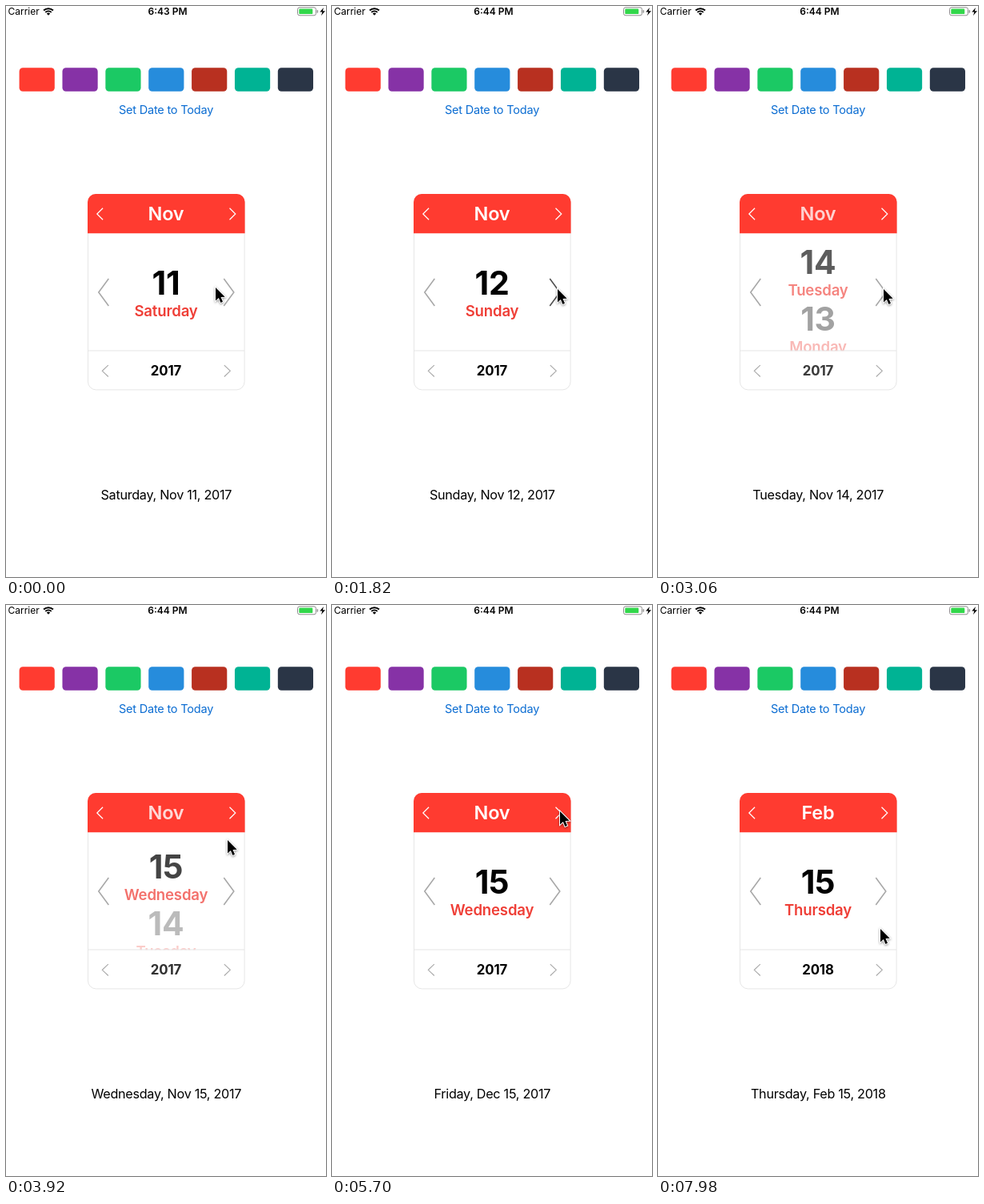
An HTML page with a canvas for the animation above (8 s loop, 400 by 714 pixels).

```html
<!DOCTYPE html>
<html lang="en">
<head>
<meta charset="utf-8">
<title>Date picker</title>
<style>
  html, body { margin: 0; width: 100%; height: 100%; overflow: hidden; background: #fff; }
  canvas { display: block; width: 400px; height: 714px; }
</style>
</head>
<body>
<canvas></canvas>
<script>
const canvas = document.querySelector('canvas');
const ctx = canvas.getContext('2d');
const ratio = window.devicePixelRatio || 1;
canvas.width = 400 * ratio;
canvas.height = 714 * ratio;

const LOOP = 8000, SLIDE = 400, PRESS = 110;
const RED = '#ff3b30', GREY = '#a8a8a8';
const SWATCHES = [RED, '#8632a6', '#1bc964', '#268cdc', '#b83020', '#00b394', '#2a3546'];

// Taps on the "next" arrows: time and which part of the date advances
const TAPS = [
  [1050, 'day'], [1920, 'day'], [2825, 'day'], [3656, 'day'],
  [5690, 'month'], [6555, 'month'], [7260, 'month']
];

// Pointer positions: time, x, y
const POINTER = [
  [0, 262, 352], [250, 262, 352], [700, 282, 354], [3720, 282, 354],
  [3920, 277, 294], [4250, 285, 258], [7450, 285, 258], [7850, 278, 405]
];

const FONTS = {
  carrier: ['400 12px', 0],
  clock: ['600 12px', 0],
  link: ['400 14.5px', -0.2],
  label: ['400 16.2px', -0.29],
  month: ['600 23.5px', -0.2],
  day: ['700 41px', -0.3],
  weekday: ['600 18.6px', -0.18],
  year: ['700 16.8px', -0.1]
};

const dateLabel = date => date.toLocaleDateString('en-US',
  { weekday: 'long', month: 'short', day: 'numeric', year: 'numeric' });

const labels = [dateLabel(new Date(2017, 10, 11))];
let days = 11, months = 10;
for (const [, unit] of TAPS) {
  if (unit === 'day') days++; else months++;
  labels.push(dateLabel(new Date(2017, months, days)));
}

const clamp = v => Math.min(1, Math.max(0, v));
const ease = v => v * v * (3 - 2 * v);

function text(str, x, y, font, color, alpha = 1, align = 'center') {
  const [style, spacing] = FONTS[font];
  ctx.font = `${style} Inter, sans-serif`;
  ctx.letterSpacing = spacing + 'px';
  ctx.textAlign = align;
  ctx.fillStyle = color;
  ctx.globalAlpha = alpha;
  ctx.fillText(str, x, y);
  ctx.globalAlpha = 1;
}

function box(x, y, w, h, radius, fill, stroke, lineWidth = 1) {
  ctx.beginPath();
  ctx.roundRect(x, y, w, h, radius);
  if (fill) { ctx.fillStyle = fill; ctx.fill(); }
  if (stroke) { ctx.strokeStyle = stroke; ctx.lineWidth = lineWidth; ctx.stroke(); }
}

function polygon(points, color) {
  ctx.beginPath();
  points.forEach(([x, y]) => ctx.lineTo(x, y));
  ctx.closePath();
  ctx.fillStyle = color;
  ctx.fill();
}

function clipped(x, y, w, h, draw) {
  ctx.save();
  ctx.beginPath();
  ctx.rect(x, y, w, h);
  ctx.clip();
  draw();
  ctx.restore();
}

function chevrons(y, inset, w, h, color, lineWidth, rightColor = color) {
  const half = 100 - 1.5 - inset;
  for (const side of [-1, 1]) {
    const tip = 200.3 + side * half;
    ctx.beginPath();
    ctx.moveTo(tip - side * w, y - h);
    ctx.lineTo(tip, y);
    ctx.lineTo(tip - side * w, y + h);
    ctx.strokeStyle = side > 0 ? rightColor : color;
    ctx.lineWidth = lineWidth;
    ctx.stroke();
  }
}

function statusBar(time) {
  text('Carrier', 2.5, 11.4, 'carrier', '#000', 1, 'left');
  text(time < 1250 ? '6:43 PM' : '6:44 PM', 202, 11.4, 'clock', '#000');

  ctx.strokeStyle = ctx.fillStyle = '#000';
  ctx.lineWidth = 2;
  const up = -Math.PI / 2, spread = 0.76;
  for (const r of [8.6, 5.4]) {
    ctx.beginPath();
    ctx.arc(53, 11.8, r, up - spread, up + spread);
    ctx.stroke();
  }
  ctx.beginPath();
  ctx.moveTo(53, 11.8);
  ctx.arc(53, 11.8, 3.2, up - spread, up + spread);
  ctx.fill();

  box(364.5, 1.8, 23, 10, 2.5, null, '#8c8c8c');
  box(366.3, 3.5, 17, 6.6, 1.2, '#32d74b');
  box(388.7, 5, 1.4, 3.8, 0.7, '#8c8c8c');
  polygon([[397, 2], [392.3, 7.5], [395.4, 7.5], [394, 12], [399, 6.2], [395.9, 6.2]], '#000');
}

// Old text gives way to new; `distance` 0 is a plain cross-fade
function swap(from, to, p, distance, y, font, color) {
  if (p < 1) text(from, 200, y + p * distance, font, color, 1 - p);
  if (p > 0) text(to, 200, y - (1 - p) * distance, font, color, p);
}

function card(time, index) {
  const [start, unit] = index ? TAPS[index - 1] : [-SLIDE, 'day'];
  const p = ease(clamp((time - start) / SLIDE));
  const now = labels[index].split(/,? /);
  const before = labels[Math.max(0, index - 1)].split(/,? /);
  const pressed = TAPS.some(([t, u]) => u === 'day' && time >= t - PRESS && time < t + 20);
  const dayShift = unit === 'day' ? 71 : 0;
  const monthShift = unit === 'month' ? 28.6 : 0;

  box(102.5, 235.5, 195.6, 244.4, 10, '#fff', '#e6e6e6');
  box(102, 235, 196.6, 49.2, [10, 10, 0, 0], RED);
  clipped(102, 235, 196.6, 49.2, () =>
    swap(before[1], now[1], p, monthShift, 268.3, 'month', '#fff'));
  clipped(103, 284.2, 194.6, 147, () => {
    swap(before[2], now[2], p, dayShift, 361, 'day', '#000');
    swap(before[0], now[0], p, dayShift, 388.2, 'weekday', '#ef3e36');
  });
  swap(before[3], now[3], p, 0, 462.2, 'year', '#000');

  ctx.fillStyle = '#e6e6e6';
  ctx.fillRect(103, 430.5, 195, 1);
  chevrons(260, 12, 7.3, 7.2, '#fff', 1.2);
  chevrons(358, 14, 12.5, 17, GREY, 1.6, pressed ? '#505050' : GREY);
  chevrons(456.3, 18.5, 7.5, 7.2, GREY, 1.1);
}

function pointer(time) {
  let i = POINTER.findIndex(([t]) => t > time);
  if (i < 0) i = POINTER.length;
  const [t0, x0, y0] = POINTER[i - 1];
  const [t1, x1, y1] = POINTER[i] || [LOOP, x0, y0];
  const p = ease((time - t0) / (t1 - t0));

  ctx.save();
  ctx.translate(x0 + (x1 - x0) * p, y0 + (y1 - y0) * p);
  ctx.shadowColor = 'rgba(0,0,0,.35)';
  ctx.shadowBlur = 3 * ratio;
  ctx.shadowOffsetY = ratio;
  const arrow = [[0, 0], [0, 16.5], [3.9, 13], [6.4, 18.9], [9, 17.8], [6.5, 12], [11.7, 11.7]];
  polygon(arrow, '#fff');
  ctx.strokeStyle = '#fff';
  ctx.lineWidth = 2;
  ctx.stroke();
  ctx.shadowColor = 'transparent';
  polygon(arrow, '#000');
  ctx.restore();
}

function draw(time) {
  const index = TAPS.filter(([t]) => t <= time).length;
  ctx.setTransform(ratio, 0, 0, ratio, 0, 0);
  ctx.fillStyle = '#fff';
  ctx.fillRect(0, 0, 400, 714);
  statusBar(time);
  SWATCHES.forEach((color, i) => box(16.6 + i * 53.87, 77.3, 44.2, 29.4, 4.5, color));
  text('Set Date to Today', 200, 134.7, 'link', '#0a6cd2');
  card(time, index);
  text(labels[index], 200.3, 616.9, 'label', '#000');
  pointer(time);
}

function tick() {
  draw(performance.now() % LOOP);
  requestAnimationFrame(tick);
}
tick();
</script>
</body>
</html>
```
